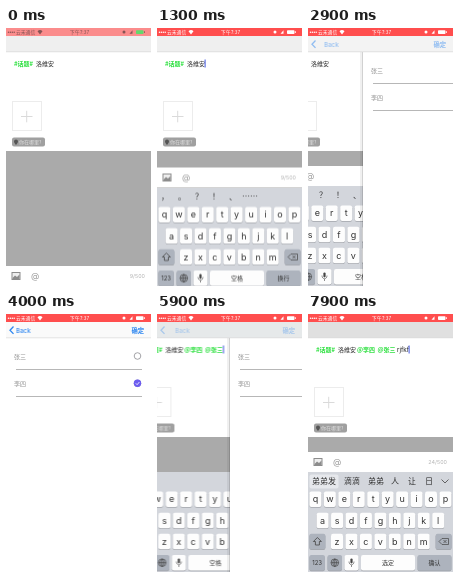
Animation, 145 px wide and 258 px high, one loop 8 s. Source, as an HTML page:

```html
<!DOCTYPE html>
<html lang="zh">
<head>
<meta charset="utf-8">
<style>
  html, body { margin: 0; width: 100%; height: 100%; overflow: hidden; background: #fff; }
  svg { display: block; width: 145px; height: 258px; }
  text { font-family: "Noto Sans CJK SC", "Noto Sans CJK", sans-serif; font-size: 6px; }
  .mid { text-anchor: middle; }
  .key { font: 9px Inter, Roboto, sans-serif; fill: #333; }
  .tag { fill: #27df3a; font-weight: 700; }
  .line { fill: none; stroke: #8d8d92; stroke-width: .8; }
  .blue { fill: #2d86f0; font-weight: 500; }
  .cand text { font-size: 8px; fill: #333; }
</style>
</head>
<body>
<svg width="145" height="258">
  <rect width="145" height="258" fill="#fff"/>

  <g id="compose">
    <rect y="24" width="145" height="234" fill="#fff"/>
    <text class="tag" x="8" y="38">#话题#</text>
    <text x="30" y="38" font-weight="500" fill="#222">洛维安</text>
    <g id="mentions" class="tag">
      <text x="49" y="38">@李四</text>
      <text x="69.5" y="38">@张三</text>
    </g>
    <g id="typed"></g>
    <rect id="caret" x="47.6" y="31.5" width="1" height="8" fill="#4358e0"/>

    <rect x="6.5" y="73.5" width="29" height="29" fill="none" stroke="#ececec"/>
    <path d="M15 88.5h11.500M20.700 82.800v11.500" stroke="#dadada" fill="none"/>
    <rect x="6" y="109.500" width="33" height="9" rx="2" fill="#a0a0a0"/>
    <path d="M10 117c-1.300-1.700-2-2.600-2-3.600a2 2 0 0 1 4 0c0 1-.7 1.900-2 3.600z" fill="#555"/>
    <text x="13" y="116" fill="#e2e2e2" style="font-size:5px">你在哪里?</text>
    <rect y="123" width="145" height="135" fill="#aaa"/>

    <g id="bar">
      <rect y="138" width="145" height="20" fill="#fff"/>
      <rect x="6" y="144.500" width="8" height="7" fill="#eee" stroke="#8c8c8c"/>
      <path d="M6.500 151v-1l2.500-2.500 2 1.500 2.500-2.500v4.500z" fill="#8c8c8c"/>
      <text class="mid" x="29" y="151" fill="#999" style="font:8.500px Inter,sans-serif">@</text>
      <g id="count"></g>
    </g>

    <g id="keyboard">
      <rect y="158" width="145" height="100" fill="#d3d6dc"/>
      <g id="cands" class="cand"></g>
      <g id="keys"></g>
    </g>
  </g>

  <g id="list">
    <rect x="-1" y="24" width="1" height="234" fill="#000" opacity=".18"/>
    <rect x="-3" y="24" width="2" height="234" fill="#000" opacity=".06"/>
    <rect y="24" width="145" height="234" fill="#fff"/>
    <g fill="#8a8a8a">
      <text x="8" y="45">张三</text>
      <text x="8" y="71.500">李四</text>
    </g>
    <path d="M10 55.500h126M10 82.500h126" stroke="#a5a5a5" stroke-width=".8"/>
    <circle cx="131.500" cy="42" r="3.300" class="line"/>
    <circle cx="131.500" cy="69.300" r="3.300" class="line"/>
    <g id="pick1"></g>
    <g id="pick2"></g>
  </g>

  <g id="nav">
    <rect id="navBg" y="8" width="145" height="16" fill="#efefef"/>
    <rect y="23.500" width="145" height=".7" fill="#d8d8d8"/>
    <g id="navItems">
      <path id="chevron" d="M7.500 12.500L4 16.200l3.500 3.700" fill="none" stroke="#2d86f0" stroke-width="1.300"/>
      <text id="back" class="blue" x="10" y="18.500" style="font:500 6.200px Inter,sans-serif">Back</text>
      <text class="blue" x="125.500" y="18.500" style="font-size:6.300px;font-weight:700">确定</text>
    </g>
  </g>

  <rect id="status" width="145" height="8" fill="#ff4e4e"/>
  <g id="statusItems" fill="#fff">
    <g id="signal"></g>
    <text x="10" y="6" style="font-size:4.800px">云禾通信</text>
    <path d="M31.500 3.300a3.600 3.600 0 0 1 5 0L34 6.500z"/>
    <text class="mid" x="73.500" y="6" style="font-size:4.900px">下午7:37</text>
    <circle cx="118" cy="4" r="1.500"/>
    <path d="M123.500 5.800l3-3.600v3.600z"/>
    <rect id="battery" x="130" y="2.200" width="7.500" height="3.800" rx=".8"/>
    <rect x="138" y="3.200" width=".8" height="1.800"/>
  </g>
</svg>

<script>
const LOOP = 8000;
const $ = id => document.getElementById(id);

function add(parent, tag, attrs, text) {
  const el = document.createElementNS('http://www.w3.org/2000/svg', tag);
  for (const k in attrs) el.setAttribute(k, attrs[k]);
  if (text) el.textContent = text;
  return parent.appendChild(el);
}

// Holds each value until the next listed time.
function track(el, prop, values, format = v => v) {
  const frames = Object.entries(values).map(([t, v]) =>
    ({ offset: t / LOOP, [prop]: format(v), easing: 'step-end' }));
  frames.push({ ...frames[frames.length - 1], offset: 1 });
  el.animate(frames, { duration: LOOP, iterations: Infinity });
}

function show(el, from, to = LOOP) {
  const values = { 0: 0, [from]: 1 };
  if (to < LOOP) values[to] = 0;
  track(el, 'opacity', values);
}

const moveX = v => `translate(${v}px, 0px)`;
const moveY = v => `translate(0px, ${v}px)`;

// Keyboard
const keys = $('keys');
function key(x, y, w, dark) {
  add(keys, 'rect', { x, y: y + .7, width: w, height: 15.5, rx: 2, fill: '#a2a5ab' });
  add(keys, 'rect', { x, y, width: w, height: 15.5, rx: 2, fill: dark ? '#adb3bd' : '#fdfdfd' });
}
function letters(row, x0, y) {
  [...row].forEach((c, i) => {
    const x = x0 + i * 14.45;
    key(x, y, 12, false);
    add(keys, 'text', { class: 'key mid', x: x + 6, y: y + 10.8 }, c);
  });
}
letters('qwertyuiop', 1.4, 177.5);
letters('asdfghjkl', 8.6, 198.7);
letters('zxcvbnm', 23, 219.8);
key(1.4, 219.8, 16, true);
key(127.6, 219.8, 16, true);
key(1.4, 241, 15.5, true);
key(19.5, 241, 14.5, true);
key(36.5, 241, 14, false);
key(53, 241, 54, false);
key(109.5, 241, 34, true);
add(keys, 'path', { d: 'M9.4 223.5l4 4h-2v3.500h-4v-3.500h-2z', fill: 'none', stroke: '#444', 'stroke-width': .8 });
add(keys, 'path', { d: 'M131 227.500l3-3h6.500v6h-6.500zM135.500 226l3 3m0-3l-3 3', fill: 'none', stroke: '#444', 'stroke-width': .7 });
add(keys, 'text', { class: 'mid', x: 9.1, y: 251, fill: '#333', style: 'font:6px Inter,sans-serif' }, '123');
add(keys, 'path', { d: 'M23 248.700a3.800 3.800 0 1 0 7.600 0a3.800 3.800 0 1 0-7.600 0h7.600M26.800 245v7.500M26.800 245c-2.500 2-2.500 5.500 0 7.500c2.500-2 2.500-5.500 0-7.500', fill: 'none', stroke: '#444', 'stroke-width': .7 });
add(keys, 'rect', { x: 42.4, y: 244.4, width: 2.2, height: 5, rx: 1.1, fill: '#444' });
add(keys, 'path', { d: 'M41 247.500c0 4.300 5 4.300 5 0M43.500 251v2', fill: 'none', stroke: '#444', 'stroke-width': .6 });

function label(x, before, after) {
  const [a, b] = [before, after].map(s => add(keys, 'text', { class: 'mid', x, y: 251, fill: '#333' }, s));
  show(a, 0, 7200);
  show(b, 7200);
}
label(80, '空格', '选定');
label(126.5, '换行', '确认');

// Suggestion strip
function strip(words, xs, from, to) {
  const g = add($('cands'), 'g', {});
  words.forEach((w, i) => add(g, 'text', { class: 'mid', x: xs(i), y: 170 }, w));
  show(g, from, to);
  return g;
}
const even = i => 8 + 17 * i;
strip(['，', '。', '？', '！', '、', '……'], even, 0, 3400);
strip([...'我嗯你啦哦哪那'], even, 6200, 7200);
strip([...'人让日如然热任'], even, 7200, 7700);
strip(['滴滴', '弟弟', '人', '让', '日'], i => [44, 68, 87, 104, 121][i], 7700);
strip(['弟弟'], () => 16, 7700, 7900);
const best = strip(['弟弟发'], () => 16, 7900);
best.prepend(add(best, 'rect', { x: 1.5, y: 160.5, width: 29, height: 14, rx: 2, fill: '#e6e8ec' }));
const arrow = add($('cands'), 'path', { d: 'M133.500 165.500l3.500 3.500 3.500-3.500', fill: 'none', stroke: '#555', 'stroke-width': .9 });
show(arrow, 6200);

// Typed letters and counter
const typed = 'rjfkf';
[...typed].forEach((c, i) => {
  const from = 7200 + i * 100;
  const el = add($('typed'), 'text', { x: 89, y: 37.8, fill: '#222', style: 'font:6.300px Inter,sans-serif' }, typed.slice(0, i + 1));
  show(el, from, i < 4 ? from + 100 : LOOP);
});
function count(n, from, to) {
  const el = add($('count'), 'text', { x: 139, y: 150, fill: '#b4b4b4', 'text-anchor': 'end', style: 'font:5.400px Inter,sans-serif' }, n + '/500');
  show(el, from, to);
}
count(9, 0, 5700);
count(19, 5700, 7200);
for (let i = 0; i < 5; i++) count(20 + i, 7200 + i * 100, i < 4 ? 7300 + i * 100 : LOOP);

// Selection marks
[['pick1', 69.3, 4000], ['pick2', 42, 5100]].forEach(([id, y, at]) => {
  const g = $(id);
  add(g, 'circle', { cx: 131.5, cy: y, r: 3.7, fill: '#6c5cf0' });
  add(g, 'path', { d: `M129.800 ${y}l1.300 1.400 2.300-2.700`, fill: 'none', stroke: '#fff', 'stroke-width': .8 });
  show(g, at);
});
for (let i = 0; i < 4; i++) add($('signal'), 'circle', { cx: 2.5 + i * 1.9, cy: 4.2, r: .75 });

// Motion
const rise = { 0: 100, 900: 58, 1000: 12.5, 1100: 6, 1200: 3, 1300: 1.5, 1400: .7, 1500: .3, 1600: 0 };
track($('keyboard'), 'transform', rise, moveY);
track($('bar'), 'transform', { ...rise, 3400: 100, 6200: 62, 6300: 22, 6400: 6, 6500: 0 }, moveY);

const slide = {
  0: 150, 2800: 108, 2900: 55, 3000: 24, 3100: 10, 3200: 4, 3300: 1, 3400: 0,
  5700: 6, 5800: 38, 5900: 73, 6000: 104, 6100: 125, 6200: 137, 6300: 142, 6400: 144, 6500: 150
};
track($('list'), 'transform', slide, moveX);
track($('compose'), 'transform', slide, v => moveX(Math.min(0, .3 * (v - 145))));
track($('navItems'), 'opacity', slide, v => Math.max(0, 1 - v / 110));
track($('back'), 'transform', slide, v => moveX(v * .11));
track($('navBg'), 'fill', { 0: '#efefef', 2800: '#f3f3f3', 3000: '#fafafa', 5700: '#f2f2f2', 5900: '#e6e9ea', 6200: '#e0e0e0' });

show($('mentions'), 5700);
track($('caret'), 'opacity', { 0: 0, 1000: 1, 1900: .4, 2000: 0, 5700: 1, 6600: 0, 6900: .5, 7000: 1 });
track($('caret'), 'transform', { 0: 0, 5700: 40, 7200: 43, 7300: 45, 7400: 47.5, 7500: 51, 7600: 53 }, moveX);

track($('status'), 'fill', { 0: '#fb8c8c', 100: '#fc7878', 200: '#fe6060', 300: '#ff4e4e' });
track($('statusItems'), 'fill', { 0: '#865454', 100: '#b08080', 200: '#e0c0c0', 300: '#ffffff' });
track($('battery'), 'fill', { 0: '#63d86c', 100: '#a0e0a0', 200: '#d8f0d8', 300: '#ffffff' });
</script>
</body>
</html>
```
